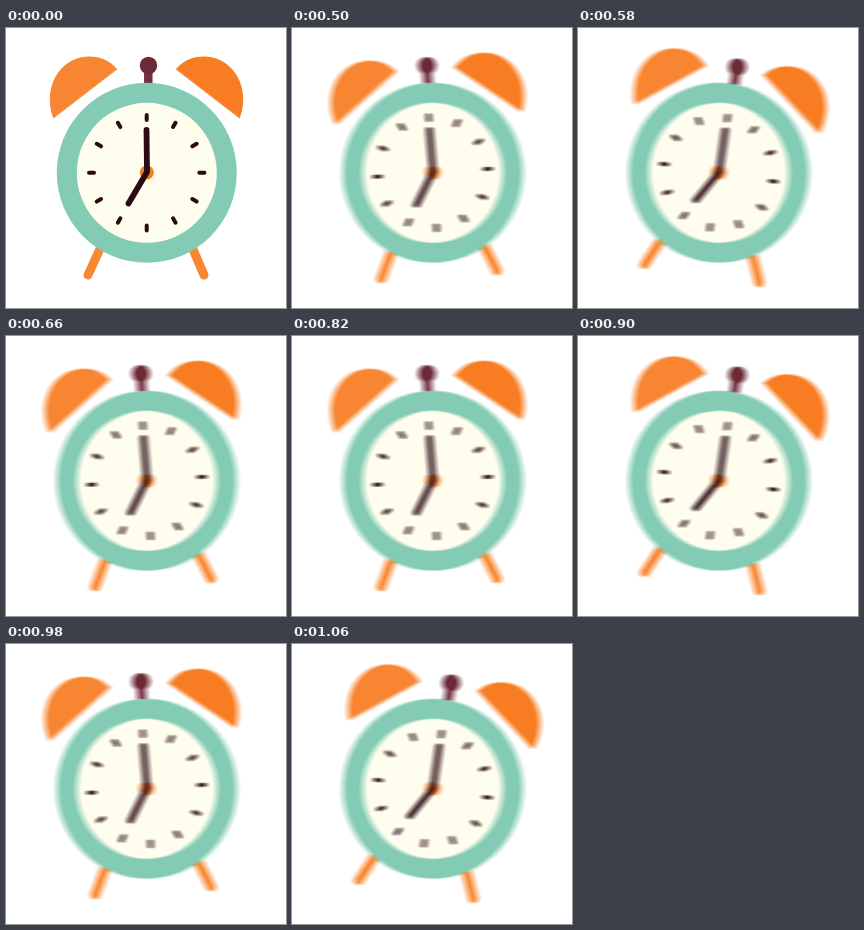
An HTML page without scripts for the animation above (1.14 s loop, 280 px wide and 280 px high).

```html
<!DOCTYPE html>
<html lang="en">
<head>
<meta charset="utf-8">
<title>Alarm clock</title>
<style>
  html, body { margin: 0; width: 100%; height: 100%; overflow: hidden; background: #fff; }
  svg { display: block; width: 100%; height: 100%; }

  .still, .ring, .wag { animation: 1140ms step-end infinite; }
  .still { animation-name: hide; }
  .ring { animation-name: show; }
  .wag { animation-name: wag; transform-origin: 141px 145px; }

  @keyframes hide { 0% { opacity: 1; } 43.859%, 100% { opacity: 0; } }
  @keyframes show { 0% { opacity: 0; } 43.859%, 100% { opacity: 1; } }
  /* 80 ms per swing after a 500 ms rest */
  @keyframes wag {
    0%, 43.859%, 57.894%, 71.929%, 85.964% { transform: rotate(-4deg); }
    50.877%, 64.912%, 78.947%, 92.982%, 100% { transform: rotate(9deg); }
  }
</style>
</head>
<body>
<svg viewBox="0 0 280 280">
  <defs>
    <!-- sideways motion blur -->
    <filter id="smear" filterUnits="userSpaceOnUse" x="0" y="0" width="280" height="280" color-interpolation-filters="sRGB">
      <feConvolveMatrix order="9 1" kernelMatrix="1 1 1 1 1 1 1 1 1" divisor="9" edgeMode="none" preserveAlpha="false"/>
    </filter>

    <path id="bell" d="M47.5 89.5C42.5 76 43 60 51 47C58 35.5 70 29 83 29C95 29 104 33.500 110.500 41Z" stroke-width="1" stroke-linejoin="round"/>
    <path id="tick" d="M140.700 87V92"/>
    <g id="quarter">
      <use href="#tick"/>
      <use href="#tick" transform="rotate(30 140.700 144.700)"/>
      <use href="#tick" transform="rotate(60 140.700 144.700)"/>
    </g>

    <g id="clock" fill="none" stroke-linecap="round">
      <path d="M98 212L82 247M183 212L198 247" stroke="#f98731" stroke-width="9"/>
      <path d="M142.300 40V60" stroke="#743040" stroke-width="8.500"/>
      <circle cx="142.500" cy="37.500" r="8.700" fill="#6c2936"/>
      <use href="#bell" fill="#f88532" stroke="#f88532"/>
      <use href="#bell" transform="matrix(-1 0 0 1 281 0)" fill="#f77c22" stroke="#f77c22"/>
      <circle cx="140.800" cy="144.800" r="90" fill="#83cbb4"/>
      <circle cx="140.800" cy="144.800" r="70" fill="#fffdee"/>
      <g stroke="#2b0b13" stroke-width="4">
        <use href="#quarter"/>
        <use href="#quarter" transform="rotate(90 140.700 144.700)"/>
        <use href="#quarter" transform="rotate(180 140.700 144.700)"/>
        <use href="#quarter" transform="rotate(270 140.700 144.700)"/>
      </g>
      <circle cx="140.800" cy="144.500" r="7" fill="#f77c22"/>
      <path d="M140.500 102L141 144L122.500 175.500" stroke="#2b0b13" stroke-width="5.800" stroke-linejoin="round"/>
    </g>
  </defs>

  <use class="still" href="#clock"/>
  <g class="ring">
    <g filter="url(#smear)">
      <g class="wag"><use href="#clock"/></g>
    </g>
  </g>
</svg>
</body>
</html>
```
